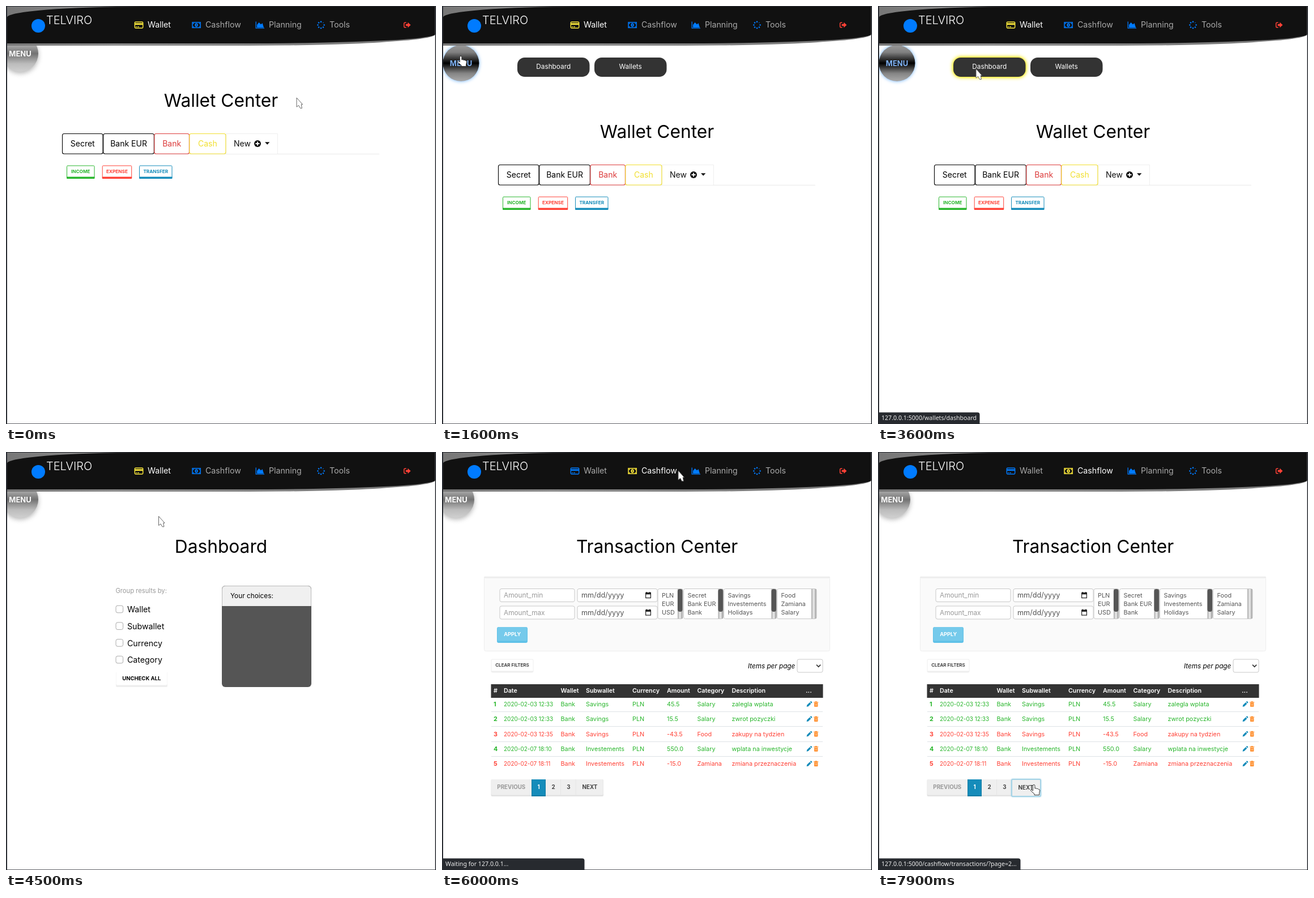
Recreate the animation shown at these times as an HTML page. Size 759 px wide and 738 px high, loop 8 s.

```html
<!DOCTYPE html>
<html lang="en">
<head>
<meta charset="utf-8">
<title>Wallet demo</title>
<style>
html, body { margin: 0; width: 100%; height: 100%; overflow: hidden; background: #fff; }
svg { display: block; width: 100%; height: 100%; font-family: Inter, "Open Sans", sans-serif; }
#status text { font-family: "Noto Sans", sans-serif; }
</style>
</head>
<body>
<svg id="stage" viewBox="0 0 759 738" xmlns="http://www.w3.org/2000/svg"></svg>
<script>
const LOOP = 8000, STEP = 100;
const GREEN = '#28b62c', RED = '#ff4136', BLUE = '#158cba', NAV = '#007bff', YELLOW = '#ffeb3b';

// Drawing helpers
const text = (x, y, s, size, fill = '#000', more = '') =>
  `<text x="${x}" y="${y}" font-size="${size}" fill="${fill}" ${more}>${s}</text>`;
const rect = (x, y, w, h, fill, more = '') =>
  `<rect x="${x}" y="${y}" width="${w}" height="${h}" fill="${fill}" ${more}/>`;
const line = (x1, y1, x2, y2, stroke, w = 1) =>
  `<path d="M${x1} ${y1}L${x2} ${y2}" stroke="${stroke}" stroke-width="${w}"/>`;
const path = (d, more = '') => `<path d="${d}" ${more}/>`;
const group = (id, body, more = '') => `<g id="${id}" ${more}>${body}</g>`;
const MID = 'text-anchor="middle"';
const BOLD = 'font-weight="700"';
const SEMI = 'font-weight="600"';
const title = s => text(379.5, 178, s, 31.7, '#000', MID);

function navItem(id, x, label, icon) {
  return group(id, icon + text(x, 38.3, label, 14.2, 'currentColor'));
}

function header() {
  const dots = Array.from({ length: 8 }, (_, i) => {
    const a = i * Math.PI / 4;
    return `<circle cx="${556 + 5.6 * Math.cos(a)}" cy="${33.5 + 5.6 * Math.sin(a)}" r="${i === 7 ? .7 : 1.3}" fill="${NAV}"/>`;
  }).join('');
  const card = `<g class="icon">${rect(227.3, 28.2, 14.4, 10.8, 'none', 'rx="1.4" stroke="currentColor" stroke-width="1.4"')}
    ${rect(227, 30.3, 15, 2.9, 'currentColor')}${line(229, 36.6, 231, 36.6, 'currentColor', 1.2)}${line(232, 36.6, 235, 36.6, 'currentColor', 1.2)}</g>`;
  const bill = `<g class="icon">${rect(329, 28.9, 14.2, 9.4, 'none', 'stroke="currentColor" stroke-width="1.5"')}
    <ellipse cx="336.1" cy="33.6" rx="2.7" ry="3.4" fill="currentColor"/>${line(336.2, 31.8, 336.2, 35.5, '#111')}
    ${path('M330 30h2.4l-2.4 2.4zM342.2 30v2.4l-2.4-2.4zM330 37.4v-2.4l2.4 2.4zM342.2 37.4h-2.4l2.4-2.4z', 'fill="currentColor"')}</g>`;
  const chart = path('M441.2 27.5V39.2H456', `fill="none" stroke="${NAV}" stroke-width="1.3"`) +
    path('M443 38V33.2L446.5 29L450 32.4L452.6 30.2L455 38Z', `fill="${NAV}"`);
  const exit = path('M706.5 29.2H704.4Q702.6 29.2 702.6 31V36Q702.6 37.8 704.4 37.8H706.5', `fill="none" stroke="${RED}" stroke-width="1.5"`) +
    path('M705.6 31.8H709.2V28.8L714.4 33.5L709.2 38.2V35.2H705.6Z', `fill="${RED}"`);
  return path('M2 1H757.5V50A330 20 0 0 1 427 70H2Z', 'fill="url(#edge)"') +
    path('M2 20A240 19 0 0 1 242 1H757.5V50A330 16 0 0 1 427 66H2Z', 'fill="#111"') +
    `<circle cx="57" cy="35" r="12" fill="${NAV}"/>` +
    text(71, 32.3, 'TELVIRO', 20, '#fff', 'font-weight="300"') +
    navItem('navWallet', 250, 'Wallet', card) +
    navItem('navCash', 352, 'Cashflow', bill) +
    `<g color="#aaa">${navItem('navPlan', 464, 'Planning', chart)}${navItem('navTools', 571, 'Tools', dots)}</g>` + exit;
}

function menu() {
  const item = (id, x, label) => group(id,
    rect(x, 91, 127.5, 34, '#333', 'rx="13"') + text(x + 63.7, 111.4, label, 11.8, '#fff', MID));
  return group('items', item('dashBtn', 133, 'Dashboard') + item('walletsBtn', 269, 'Wallets')) +
    group('menu', '<circle id="disc" r="32" fill="url(#steel)"/>' +
      text(0, 4.8, 'MENU', 13, '#fff', `id="menuText" ${BOLD} ${MID}`));
}

function walletPage() {
  const tab = (x, w, label, color) =>
    rect(x + .5, 225.5, w, 35.5, '#fff', `rx="3" stroke="${color}" stroke-width="1.1"`) +
    text(x + w / 2 + .5, 248, label, 14, color, MID);
  const action = (x, w, label, color) =>
    rect(x + .5, 282, w, 22, '#fff', `rx="1.5" stroke="${color}"`) + rect(x, 301.6, w + 1, 3.4, color, 'rx="1"') +
    text(x + w / 2 + .5, 295.2, label, 8.2, color, `${BOLD} ${MID}`);
  return title('Wallet Center') + line(99, 261.3, 659, 261.3, '#e9e9e9') +
    path('M388.5 261V225.5H479.5V261', 'fill="#fff" stroke="#eee"') +
    tab(99, 71.5, 'Secret', '#000') + tab(171.3, 89.5, 'Bank EUR', '#000') +
    tab(261.4, 61.5, 'Bank', '#dc3b3b') + tab(323.4, 64, 'Cash', '#f1df2e') +
    text(402, 248, 'New', 14, '#111') + '<circle cx="444" cy="243" r="6" fill="#111"/>' +
    path('M440.5 243H447.5M444 239.5V246.5', 'stroke="#fff" stroke-width="1.8"') +
    path('M457 240.3H465.4L461.2 244.7Z', 'fill="#111"') +
    action(107, 48.5, 'INCOME', GREEN) + action(169.7, 51.5, 'EXPENSE', RED) + action(235, 57.5, 'TRANSFER', BLUE);
}

function dashPage() {
  const checks = ['Wallet', 'Subwallet', 'Currency', 'Category'].map((s, i) => {
    const y = 271.2 + i * 29.7;
    return rect(194, y, 12.6, 12.6, '#fff', 'rx="3" stroke="#aaa"') + text(214, y + 12, s, 14.2);
  }).join('');
  return title('Dashboard') + text(193.5, 249, 'Group results by:', 11.2, '#999') + checks +
    rect(194, 388, 91, 27, '#eee', 'rx="2"') + rect(194.5, 386, 90, 25.5, '#fff', 'rx="2"') +
    text(239.3, 403, 'UNCHECK ALL', 9.5, '#000', `${BOLD} ${MID}`) +
    rect(381, 236, 158, 179, '#555', 'rx="6"') +
    path('M381.5 272V242.5Q381.5 236.5 387.5 236.5H532.5Q538.5 236.5 538.5 242.5V272Z', 'fill="#f0f0f0"') +
    path('M381.5 272V242.5Q381.5 236.5 387.5 236.5H532.5Q538.5 236.5 538.5 242.5V272', 'fill="none" stroke="#bbb"') +
    text(396, 258, 'Your choices:', 11.8);
}

function cashPage() {
  const field = (x, y, w, h) => rect(x + .5, y + .5, w, h, '#fff', 'rx="3" stroke="#c8c8c8"');
  const amount = (y, s) => field(101.5, y, 132, 23) + text(109, y + 16, s, 11.8, '#999');
  const date = y => field(238.5, y, 141, 23) + text(246, y + 16.2, 'mm/dd/yyyy', 12.7, '#555') +
    rect(359.6, y + 8, 8.8, 8.6, 'none', 'stroke="#222" stroke-width="1.2"') +
    rect(359, y + 7, 10, 3.4, '#222') + rect(360.5, y + 6, 1.6, 2, '#222') + rect(366, y + 6, 1.6, 2, '#222');
  const list = (x, w, bar, rows) => field(x, 241, w, 53) +
    rows.map((s, i) => text(x + 7.5, 256.8 + i * 15.2, s, 10.8, '#555')).join('') +
    rect(x + w - 8.6, 242, 8.6, 52, 'url(#track)') +
    (bar ? rect(x + w - 8.6, 242, 8.6, 40, '#555', 'rx="4"') : '');
  const cols = [91, 109, 209.5, 254, 336, 397, 450.5, 511.5];
  const heads = ['#', 'Date', 'Wallet', 'Subwallet', 'Currency', 'Amount', 'Category', 'Description'];
  const rows = [
    '2020-02-03 12:33|Savings|45.5|Salary|zalegla wplata',
    '2020-02-03 12:33|Savings|15.5|Salary|zwrot pozyczki',
    '2020-02-03 12:35|Savings|-43.5|Food|zakupy na tydzien',
    '2020-02-07 18:10|Investements|550.0|Salary|wplata na inwestycje',
    '2020-02-07 18:11|Investements|-15.0|Zamiana|zmiana przeznaczenia'
  ].map((row, i) => {
    const [when, sub, sum, cat, note] = row.split('|'), y = 445.2 + i * 26.3;
    const color = sum[0] === '-' ? RED : GREEN;
    const rule = Math.floor(y + 13.3) + .5;
    return [i + 1, when, 'Bank', sub, 'PLN', sum, cat, note].map((s, c) =>
      text(cols[c], y + 3.9, s, c === 1 ? 10 : 10.8, color, c ? '' : BOLD)).join('') +
      path(`M643.6 ${y + 4.6}l.6-3 4.8-4.8 2.4 2.4-4.8 4.8zM649.7 ${y - 3.9}l1-1q.6-.5 1.2 0l1.2 1.2q.5.6 0 1.2l-1 1z`, `fill="${BLUE}"`) +
      path(`M656.2 ${y - 3.4}h8M658.8 ${y - 4.4}h2.8`, 'stroke="#ff851b" stroke-width="1.3"') +
      rect(657, y - 2.2, 6.4, 6.8, '#ff851b', 'rx=".8"') +
      path(`M659 ${y - 1}v4.2M661.4 ${y - 1}v4.2`, 'stroke="#fff" stroke-width=".7"') +
      (i < 4 ? line(87, rule, 672, rule, '#dee2e6') : '');
  }).join('');
  const page = (x, s, color = '#444') => text(x, 595.3, s, 9.8, color, `${BOLD} ${MID}`);

  return title('Transaction Center') +
    rect(74.5, 220.5, 610, 131, '#fafafa', 'rx="3" stroke="#eee"') + rect(74, 219.8, 611, 3, '#ededed', 'rx="1.5"') +
    amount(241, 'Amount_min') + amount(271.5, 'Amount_max') + date(241) + date(271.5) +
    list(380.5, 44, 1, ['PLN', 'EUR', 'USD']) + list(426, 70, 1, ['Secret', 'Bank EUR', 'Bank']) +
    list(497, 93, 1, ['Savings', 'Investements', 'Holidays']) + list(591, 69.5, 0, ['Food', 'Zamiana', 'Salary']) +
    rect(97, 309, 54, 28, '#5fc1e8', 'rx="3"') + rect(98, 309, 52, 24.5, '#75caeb', 'rx="2"') +
    text(124.2, 324.6, 'APPLY', 9.2, '#fff', `${BOLD} ${MID}`) +
    rect(87, 366, 74, 23, '#fff', 'rx="2" stroke="#eee"') + rect(87, 386.5, 74, 2.5, '#eee') +
    text(124, 379.2, 'CLEAR FILTERS', 8, '#333', `${SEMI} ${MID}`) +
    text(540, 381.6, 'Items per page', 11.7, '#000', 'font-style="italic"') + field(626.5, 365.5, 45, 23) +
    path('M661 375.6L664.6 379.3L668.2 375.6', 'fill="none" stroke="#333" stroke-width="1.6"') +
    rect(86.5, 410, 586, 24, '#333') +
    heads.map((s, c) => text(cols[c], 425.3, s, 10.7, '#fff', SEMI)).join('') +
    text(642, 425.3, '...', 10.7, '#fff', BOLD) + rows +
    rect(86.5, 578, 198.5, 30, '#e2e2e2', 'rx="2"') + rect(87, 578, 197.5, 27.6, '#efefef', 'rx="2"') +
    line(209.5, 578, 209.5, 606, '#e6e6e6') + line(236, 578, 236, 606, '#e6e6e6') +
    rect(158, 578, 25, 30, '#127ba3') + rect(159, 578, 23, 28, BLUE) +
    page(122.3, 'PREVIOUS', '#999') + page(170.5, '1', '#fff') +
    page(196.5, '2') + page(223.5, '3') +
    group('focus', rect(236, 578, 51, 30, '#efefef', 'rx="2" stroke="#a5d3e6" stroke-width="2" style="filter:drop-shadow(0 0 1px #9fd4ea)"')) +
    group('next', page(261, 'NEXT'));
}

const stage = document.getElementById('stage');
stage.innerHTML = `<defs>
  <linearGradient id="edge" x1="0" x2="1"><stop stop-color="#777"/><stop offset=".25" stop-color="#8c8c8c"/><stop offset="1" stop-color="#777"/></linearGradient>
  <linearGradient id="steel" x1="0" x2="0" y1="0" y2="1"><stop stop-color="#999"/><stop offset=".2" stop-color="#808080"/><stop offset=".5" stop-color="#000"/><stop offset=".78" stop-color="#858585"/><stop offset="1" stop-color="#aaa"/></linearGradient>
  <linearGradient id="track"><stop stop-color="#aaa"/><stop offset=".5" stop-color="#eee"/><stop offset="1" stop-color="#999"/></linearGradient>
  </defs>` + rect(0, 0, 759, 738, '#fff') +
  group('wallet', walletPage()) + group('dash', dashPage()) + group('cash', cashPage()) + menu() + header() +
  path('M0 0H759V738H0ZM2 1V737.2H757.5V1Z', 'fill="#2a2d33" fill-rule="evenodd"') +
  group('status', '<path id="bar" fill="#272a2f"/>' + text(6, 731.3, '', 10.6, '#eee', 'id="url"')) +
  group('arrow', path('M0 0V16.2L3.6 13.4L6.4 18.4H9.4L8.2 11.8H10.6Z'), 'fill="#fff" stroke="#555" stroke-width=".9"') +
  group('hand', path('M-1.6 10V1.2Q-1.4-.6.2-.6Q1.8-.6 1.9 1.2V6Q4.4 4.8 5.2 6.6Q7.4 5.6 8.2 7.6Q10.4 7 10.6 9.2L9.6 15V17.6H1V15.6L-5.2 10.2Q-6.2 9.4-5.2 8.6Q-4 7.6-1.6 10Z'), 'fill="#fff" stroke="#333" stroke-width="1"');

const $ = id => document.getElementById(id);
const show = (id, on) => $(id).setAttribute('display', on ? 'inline' : 'none');
const move = (id, x, y) => $(id).setAttribute('transform', `translate(${x} ${y})`);
const mix = (a, b, k) => a + (b - a) * k;
const between = (t, a, b) => t >= a && t < b;
function ramp(t, a, b) {
  const k = Math.min(1, Math.max(0, (t - a) / (b - a)));
  return k * k * (3 - 2 * k);
}

// Pointer stops: time, x, y
const stops = [
  [0, 513, 162], [300, 513, 162], [1000, 46, 92], [1200, 46, 92], [1500, 33, 89], [1900, 33, 89],
  [2400, 244, 113], [3000, 244, 113], [3100, 173, 111], [3800, 173, 111], [4500, 269.5, 113.5],
  [4700, 269.5, 113.5], [5200, 417, 33], [6400, 417, 33], [6800, 520, 250], [7400, 275, 588], [8000, 275, 588]
];

function pointer(t) {
  const i = Math.max(1, stops.findIndex(s => s[0] >= t));
  const [t0, x0, y0] = stops[i - 1], [t1, x1, y1] = stops[i];
  const k = ramp(t, t0, t1);
  return [mix(x0, x1, k), mix(y0, y1, k)];
}

function statusAt(t) {
  const host = '127.0.0.1:5000/';
  if (between(t, 2800, 3700)) return [host + 'wallets/dashboard', 179.5];
  if (between(t, 5200, 5500)) return [host + 'cashflow/transactions/', 251.5];
  if (between(t, 5500, 6500)) return ['Waiting for 127.0.0.1...', 251.5];
  if (t >= 7700) return [host + 'cashflow/transactions/?page=2...', 251.5];
  return null;
}

function nav(id, active, hover) {
  $(id).setAttribute('color', active || hover ? '#fff' : '#aaa');
  $(id).querySelector('.icon').setAttribute('color', active ? YELLOW : NAV);
}

function draw(t) {
  const onWallet = t < 3700, onCash = t >= 6000;
  show('wallet', onWallet);
  show('dash', !onWallet && !onCash);
  show('cash', onCash);
  nav('navWallet', !onCash, false);
  nav('navCash', onCash, t >= 5100);

  const open = onWallet ? ramp(t, 1100, 1500) : 0;
  move('wallet', 0, 55 * ramp(t, 900, 1100));
  move('menu', mix(25, 33.5, open), mix(84, 101, open));
  $('disc').setAttribute('opacity', mix(.55, 1, open));
  $('disc').style.filter = open > .5 ? 'drop-shadow(0 0 3px #6db3ff)' : 'drop-shadow(0 3px 4px #777)';
  $('menuText').style.fill = `color-mix(in srgb, #fff, #80b4f8 ${open * 100}%)`;
  $('items').setAttribute('opacity', open);
  const glow = ramp(t, 2100, 2400);
  $('dashBtn').style.filter = glow ? `drop-shadow(0 0 ${3.5 * glow}px #ffee20) drop-shadow(0 0 ${1.5 * glow}px #ffee20)` : '';

  show('focus', t >= 7900);
  move('next', 0, t >= 7900 ? 1 : 0);

  const status = statusAt(t);
  show('status', status);
  if (status) {
    $('url').textContent = status[0];
    $('bar').setAttribute('d', `M1 738V717.5H${status[1] - 4}q4 0 4 4V738Z`);
  }

  const hand = between(t, 1000, 2100) || between(t, 2300, 3100) || between(t, 5100, 5500) || t >= 7400;
  const [x, y] = pointer(t);
  show('hand', hand);
  show('arrow', !hand);
  move(hand ? 'hand' : 'arrow', x, y);
}

const start = performance.now();
function tick() {
  const t = (performance.now() - start) % LOOP;
  draw(Math.floor(t / STEP) * STEP);
  requestAnimationFrame(tick);
}
tick();
</script>
</body>
</html>
```
